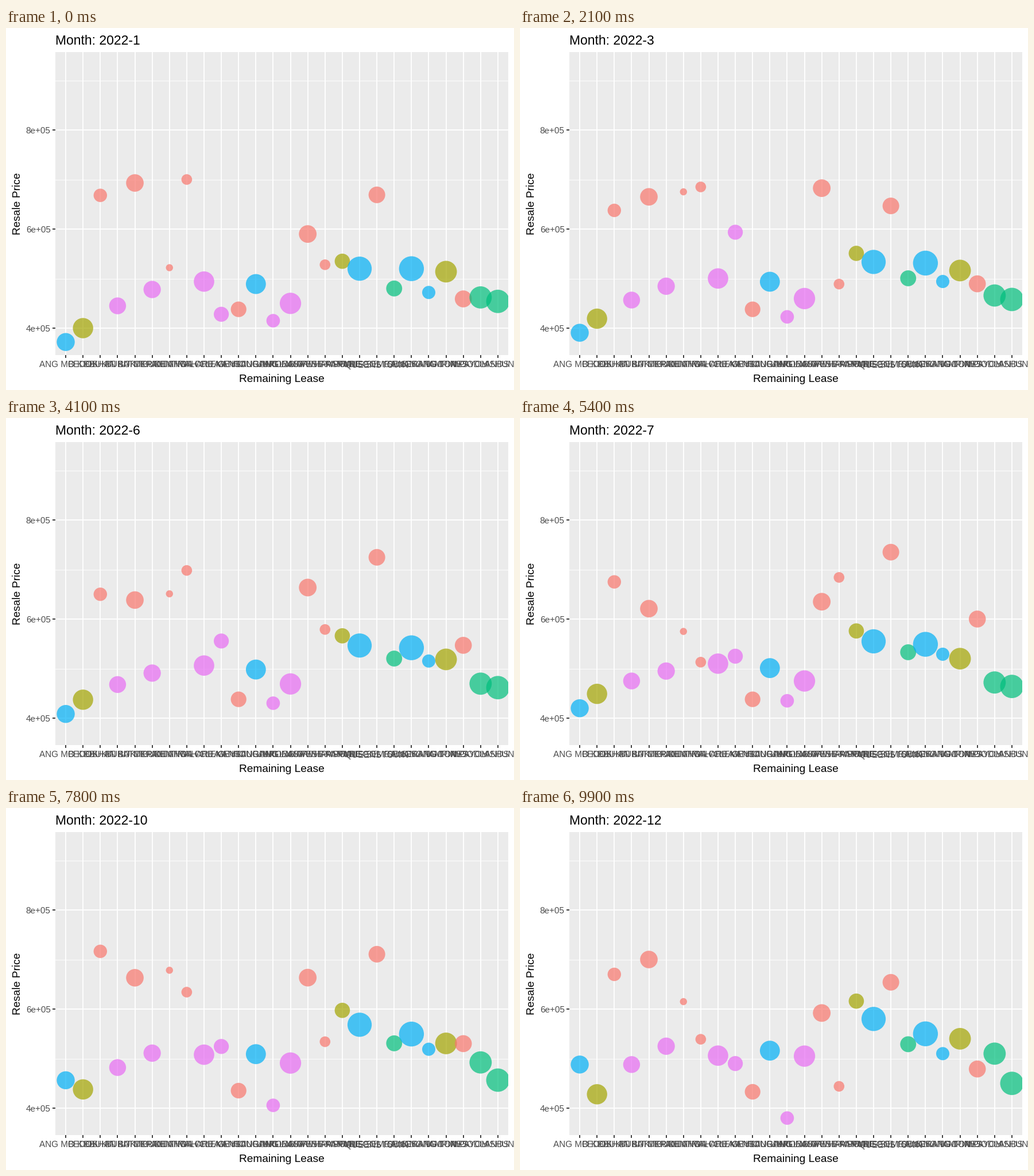
A matplotlib script that plays this animation: 885 px wide and 632 px high, repeating every 10000 ms.

```python
import numpy as np
import matplotlib.pyplot as plt
from matplotlib.animation import FuncAnimation

W, H, DPI = 885, 632, 100
FRAMES, STEPS = 100, 9              # nine steps from one month to the next
LEFT, RIGHT, TOP, BOTTOM = 86, 875, 42, 571
Y400, PX_PER_K = 524, 0.865         # height of 4e+05, pixels per thousand

# Calm towns drift between three key prices, restless ones between seven
KEYS = {3: [0, 54, 99], 7: [0, 14, 29, 54, 69, 86, 99]}

# Region color -> town: bubble radius in pixels, key prices in thousands
REGIONS = {
    "#F8766D": {
        "BISHAN": (11.7, 668, 647, 627, 675, 699, 732, 670),
        "BUKIT MERAH": (15.3, 693, 621, 700),
        "BUKIT TIMAH": (6.2, 522, 635, 721, 575, 601, 747, 615),
        "CENTRAL AREA": (9.3, 700, 524, 869, 513, 587, 676, 539),
        "GEYLANG": (13.6, 438, 438, 433),
        "KALLANG/WHAMPOA": (15.4, 590, 676, 690, 635, 692, 638, 592),
        "MARINE PARADE": (9.3, 528, 495, 482, 684, 461, 599, 444),
        "QUEENSTOWN": (14.5, 669, 587, 715, 735, 726, 697, 654),
        "TOA PAYOH": (14.8, 459, 482, 498, 600, 617, 453, 479),
    },
    "#A3A500": {
        "BEDOK": (17.7, 400, 449, 428),
        "PASIR RIS": (13.3, 535, 576, 616),
        "TAMPINES": (18.9, 514, 520, 540),
    },
    "#00BF7D": {
        "SEMBAWANG": (13.9, 480, 533, 529),
        "WOODLANDS": (19.4, 462, 472, 510),
        "YISHUN": (20.4, 454, 464, 450),
    },
    "#00B0F6": {
        "ANG MO KIO": (15.7, 372, 420, 488),
        "HOUGANG": (17.4, 489, 501, 516),
        "PUNGGOL": (21.1, 520, 555, 580),
        "SENGKANG": (21.7, 520, 549, 550),
        "SERANGOON": (11.5, 472, 529, 510),
    },
    "#E76BF3": {
        "BUKIT BATOK": (14.7, 445, 475, 488),
        "BUKIT PANJANG": (15.1, 478, 495, 525),
        "CHOA CHU KANG": (17.8, 494, 510, 506),
        "CLEMENTI": (13.1, 428, 602, 584, 525, 516, 532, 490),
        "JURONG EAST": (11.8, 415, 435, 380),
        "JURONG WEST": (18.6, 450, 475, 505),
    },
}

towns = sorted((name, color, radius, prices)
               for color, group in REGIONS.items()
               for name, (radius, *prices) in group.items())
names, colors, radii, tracks = zip(*towns)
xs = np.arange(1, len(names) + 1)


def prices_at(frame):
    return [np.interp(frame, KEYS[len(t)], t) for t in tracks]


def px(size):
    return size * 72 / DPI


plt.rcParams.update({"font.family": "Liberation Sans",
                     "text.hinting": "default"})
fig = plt.figure(figsize=(W / DPI, H / DPI), dpi=DPI, facecolor="white")


def label(x, y, text, size, color="black", **kw):
    return fig.text(x / W, 1 - y / H, text, fontsize=px(size), color=color,
                    va="baseline", rotation_mode="anchor", **kw)


ax = fig.add_axes([LEFT / W, 1 - BOTTOM / H,
                   (RIGHT - LEFT) / W, (BOTTOM - TOP) / H],
                  facecolor="#EBEBEB")
ax.set_xlim(0.4, len(names) + 0.6)
ax.set_ylim(*(400 + (Y400 - y) / PX_PER_K for y in (BOTTOM, TOP)))
ax.spines[:].set_visible(False)
ax.set_axisbelow(True)
ax.set_xticks(xs, [""] * len(xs))
ax.set_yticks([400, 600, 800], [""] * 3)
ax.set_yticks([500, 700, 900], minor=True)
ax.tick_params(which="major", length=px(4.8), width=px(1.85), color="#333333")
ax.tick_params(which="minor", length=0)
ax.grid(which="minor", axis="y", color="white", lw=px(0.93))
ax.grid(which="major", color="white", lw=px(1.85))

title = label(86.3, 28.6, "", 22.9)
label((LEFT + RIGHT) / 2, 618, "Remaining Lease", 19.1, ha="center")
label(25.3, (TOP + BOTTOM) / 2, "Resale Price", 19.1, ha="center", rotation=90)
for v in (4, 6, 8):
    label(77.7, Y400 - (v - 4) * 100 * PX_PER_K + 5.7, f"{v}e+05", 15.28,
          "#4D4D4D", ha="right")
step = (RIGHT - LEFT) / (len(names) + 0.2)
for x, name in zip(xs, names):
    label(LEFT + (x - 0.4) * step, 592.5, name, 15.28, "#4D4D4D", ha="center")

bubbles = ax.scatter(xs, prices_at(0), s=px(2 * np.array(radii)) ** 2,
                     c=colors, alpha=0.7, linewidths=0, zorder=3)


def draw(frame):
    bubbles.set_offsets(np.column_stack([xs, prices_at(frame)]))
    title.set_text(f"Month: 2022-{round(frame / STEPS) + 1}")
    return bubbles, title


anim = FuncAnimation(fig, draw, frames=FRAMES, interval=100, repeat=True,
                     repeat_delay=0)
plt.show()
```
